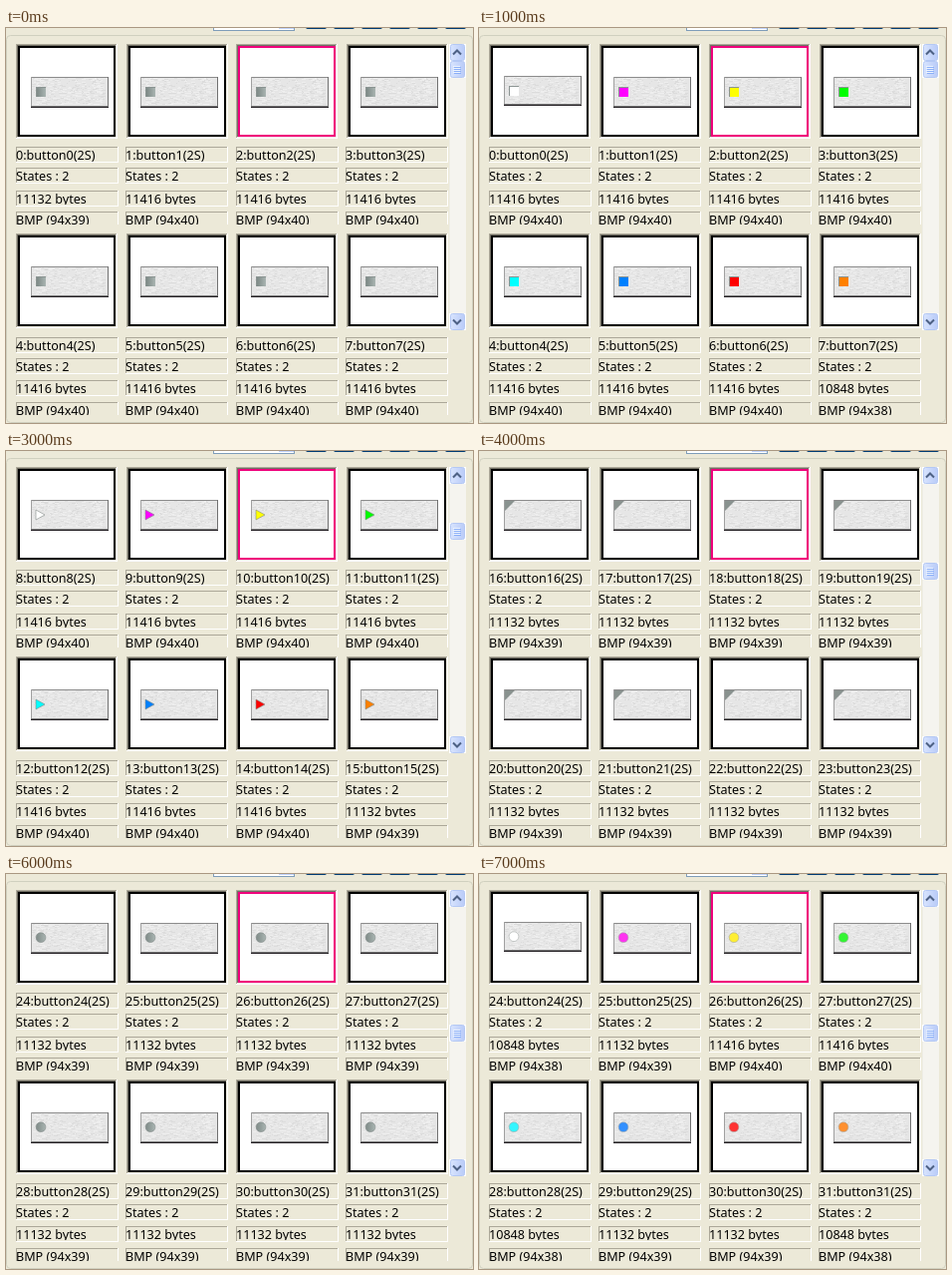
An HTML page for the animation above (8000 ms loop, 469x396 px).

```html
<!DOCTYPE html>
<html lang="en">
<head>
<meta charset="utf-8">
<title>Button gallery</title>
<style>
html, body { margin: 0; width: 100%; height: 100%; overflow: hidden; background: #ece9d8; }
svg { display: block; width: 469px; height: 396px; shape-rendering: crispEdges; }
text { font: 12.6px "Noto Sans", sans-serif; fill: #000; }
.smooth { shape-rendering: auto; }
.view { visibility: hidden; animation: show 8s step-end infinite; }
@keyframes show { 0% { visibility: visible; } 12.5%, 100% { visibility: hidden; } }
</style>
</head>
<body>
<svg id="stage" viewBox="0 0 469 396"></svg>
<script>
const COLS = [10, 120, 231, 341], ROWS = [16, 206];
// top, box height, visible text height
const LABELS = [[119.4, 16, 15], [140.4, 16, 15], [162.6, 16, 14], [184, 13, 13]];
const BASE = 13;
const BYTES = { 38: 10848, 39: 11132, 40: 11416 };
const PURE = ["#fff", "#f0f", "#ff0", "#0f0", "#0ff", "#0080ff", "#f00", "#ff8000"];
const SOFT = ["#fff", "#ff33f0", "#ffee33", "#33f533", "#33f5ff", "#3390ff", "#ff3333", "#ff9030"];
const same = h => Array(8).fill(h);
const labelTop = (k, row) => Math.round(LABELS[k][0] + row * 190.6);

const PAGES = [
  { icon: "square", thumb: 33, off: [39, ...same(40).slice(1)], on: [...same(40).slice(1), 38] },
  { icon: "play", thumb: 72, off: same(40), on: [40, 40, 40, 40, 40, 40, 40, 39] },
  { icon: "corner", thumb: 112, off: same(39), on: [40, 39, 39, 39, 39, 39, 39, 40] },
  { icon: "circle", thumb: 151, off: same(39), on: [38, 39, 40, 40, 38, 39, 39, 38] }
];

const rect = (x, y, w, h, fill, extra = "") =>
  `<rect x="${x}" y="${y}" width="${w}" height="${h}" fill="${fill}" ${extra}/>`;
const path = (d, fill, extra = "") => `<path d="${d}" fill="${fill}" ${extra}/>`;
const sunken = (x, y, w, h, dark = "#aca899", light = "#fff") =>
  rect(x, y, w, 1, dark) + rect(x, y, 1, h, dark) +
  rect(x, y + h - 1, w, 1, light) + rect(x + w - 1, y, 1, h, light);

let seed = 17;
const rand = () => (seed = seed * 16807 % 2147483647) / 2147483647;
function grain(color, count) {
  let d = "";
  for (let i = 0; i < count; i++) {
    const x = 1 + Math.floor(rand() * 72), y = 1.5 + Math.floor(rand() * 27);
    d += `M${x} ${y}h${1 + Math.floor(rand() * 4)}`;
  }
  return path(d, "none", `stroke="${color}"`);
}

const ICONS = {
  square: c => rect(5, 10, 10, 10, "#8b9492") + rect(6, 11, 9, 9, c || "url(#steel)"),
  play: c => path("M5 10L14 15L5 20Z", c || "#929b98", 'class="smooth" stroke="#818a87" stroke-width=".6"'),
  corner: c => path("M1 1H11L1 11Z", c || "#89928f", 'class="smooth"'),
  circle: c => `<circle cx="10" cy="14.7" r="4.9" class="smooth" fill="${c || "url(#steel)"}" stroke="${c ? "#a4aaa8" : "#858e8b"}" stroke-width=".6"/>`
};

function button(x, y, icon, color, raised) {
  const h = raised ? 30 : 31;
  return `<g transform="translate(${x} ${y})">` +
    rect(0, 0, 78, h, "#e6e6e6") + '<use href="#grain"/>' +
    rect(0, 0, 78, 1, "#8c8c8c") + rect(0, 0, 1, h, "#a0a0a0") +
    rect(77, 0, 1, h, "#707070") + rect(0, h - 2, 78, 1, "#777") +
    rect(0, h - 1, 78, 1, "#242024") + ICONS[icon](color) + "</g>";
}

function cell(page, lit, i) {
  const { icon, on, off } = PAGES[page], x = COLS[i % 4], row = i >> 2, n = page * 8 + i;
  const size = (lit ? on : off)[i];
  const raised = size === 38 && i < 4 || lit && i === 0 && icon !== "play";
  const color = lit && (icon === "circle" ? SOFT : PURE)[i];
  const lines = [`${n}:button${n}(2S)`, "States : 2", `${BYTES[size]} bytes`, `BMP (94x${size})`];
  return button(x + 15, ROWS[row] + (raised ? 32 : 33), icon, color, raised) +
    lines.map((s, k) =>
      `<g clip-path="url(#clip${k})" transform="translate(${x} ${labelTop(k, row)})"><text y="${BASE}">${s}</text></g>`
    ).join("");
}

function tile(i) {
  const col = i % 4, row = i >> 2, x = Math.round(10 + col * 110.5), y = ROWS[row];
  return sunken(x, y, 102, 95) + sunken(x + 1, y + 1, 100, 93, "#716f64", "#f1efe2") +
    rect(x + 2, y + 2, 98, 91, i === 2 ? "#f0007c" : "#000") +
    rect(x + 4, y + 4, 94, 87, "#fff") +
    LABELS.map(([, h], k) => {
      const left = COLS[col], top = labelTop(k, row);
      return k < 3 ? sunken(left, top, 103, h)
        : rect(left, top, 103, 1, "#aca899") + rect(left, top, 1, h, "#aca899") +
          rect(left + 102, top, 1, h, "#fff");
    }).join("");
}

const knob = (y, h) => rect(445, y, 17, h, "#fff") +
  rect(446.5, y + .5, 14, h - 1, "url(#blue)", 'rx="2" class="smooth" stroke="#b4c8f4"');
const arrow = d => path(d, "none", 'class="smooth" stroke="#4d6185" stroke-width="2"');

function thumb(y) {
  let s = knob(y, 17);
  for (let k = 0; k < 4; k++) s += rect(449, y + 5 + k * 2, 7, 1, "#eef4fe") + rect(450, y + 6 + k * 2, 7, 1, "#8cb0f8");
  return s;
}

const cells = [...Array(8).keys()];
const shell = rect(0, 0, 469, 396, "#ece9d8") +
  rect(208.5, -14.5, 81, 17, "#fff", 'stroke="#7f9db9"') + rect(274, -10, 15, 11, "#c1d3fb") +
  [0, 1, 2, 3, 4, 5].map(i => rect(301 + i * 28, -10, 21, 11, "#003c74", 'rx="2" class="smooth"')).join("") +
  rect(.5, 7.5, 468, 388, "none", 'rx="4" class="smooth" stroke="#d0d0bf"') +
  rect(445, 16, 17, 287, "#f5f4ef") + rect(445, 16, 1, 287, "#eeede5") +
  knob(16, 17) + knob(286, 17) + arrow("M449 26.5L453 22.5L457 26.5") + arrow("M449 292.5L453 296.5L457 292.5") +
  cells.map(tile).join("");

const defs = `<defs>
  <linearGradient id="blue"><stop stop-color="#d8e4fe"/><stop offset="1" stop-color="#b9cbf8"/></linearGradient>
  <linearGradient id="steel"><stop stop-color="#7d8986"/><stop offset="1" stop-color="#aab5b2"/></linearGradient>
  <g id="grain">${grain("#dcdcdc", 170)}${grain("#eeeeee", 170)}</g>
  ${LABELS.map(([, , h], k) => `<clipPath id="clip${k}">${rect(0, 0, 102, h, "#000")}</clipPath>`).join("")}
</defs>`;

const views = cells.map(t => {
  const page = t >> 1;
  return `<g class="view" style="animation-delay:${t - 8}s">` +
    thumb(PAGES[page].thumb) + cells.map(i => cell(page, t % 2 === 1, i)).join("") + "</g>";
}).join("");

document.getElementById("stage").innerHTML = defs + shell + views;
</script>
</body>
</html>
```
